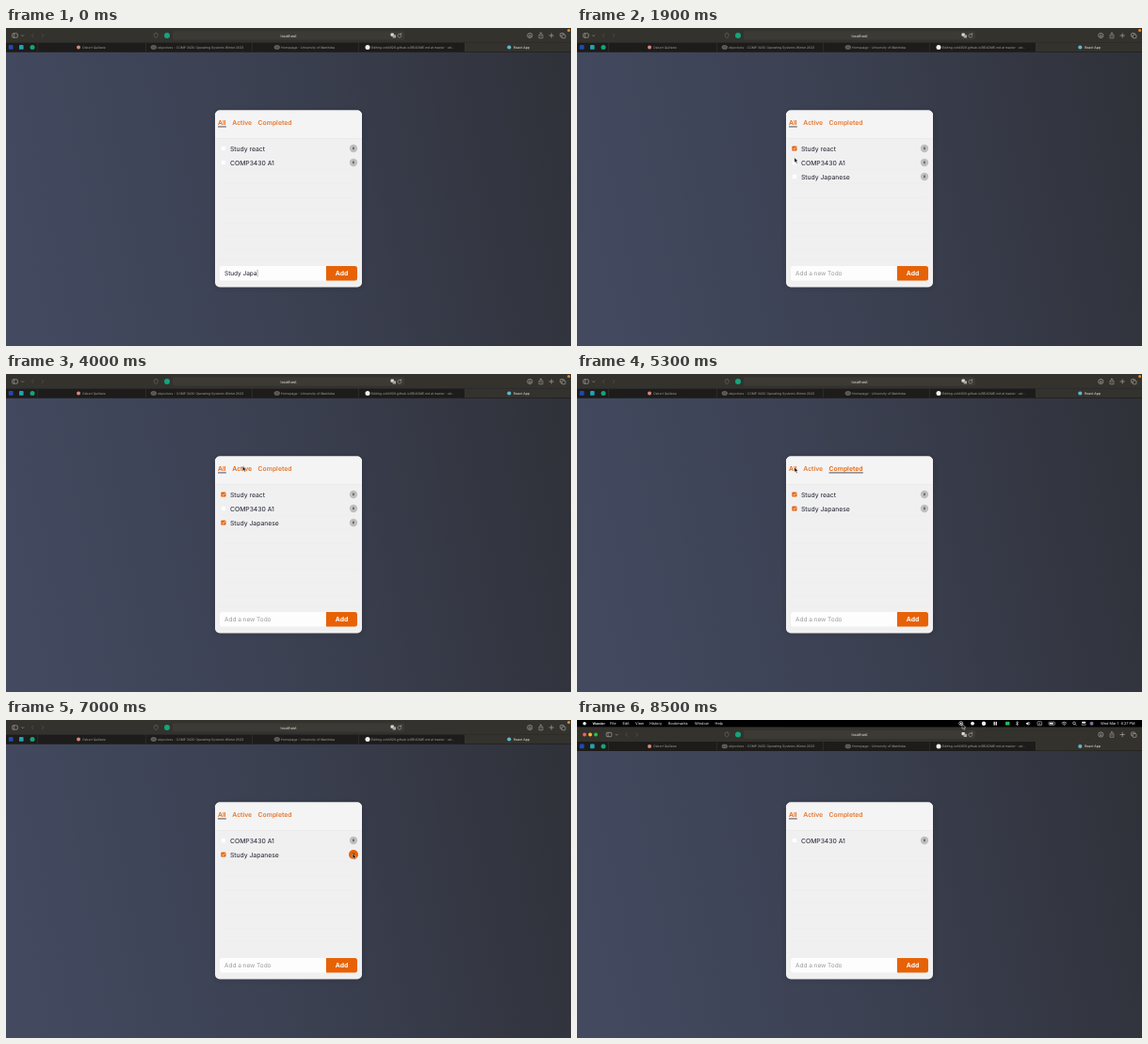
These frames come from a looping animation (600x338 px, 8600 ms). An HTML page:

```html
<!DOCTYPE html>
<html lang="en">
<head>
<meta charset="utf-8">
<title>Todo list</title>
<style>
  html, body { margin: 0; width: 100%; height: 100%; overflow: hidden; background: #31343c; }
  svg { display: block; width: 100%; height: 100%; }
  text { font-family: Inter, Roboto, sans-serif; text-rendering: geometricPrecision; white-space: pre; }
</style>
</head>
<body>
<svg id="stage" viewBox="0 0 600 338" xmlns="http://www.w3.org/2000/svg"></svg>
<script>
const LOOP = 8600, STEP = 100;
const ORANGE = '#e76206', INK = '#1d1f2c';

const rect = (x, y, w, h, fill, rx = 0, more = '') =>
  `<rect x="${x}" y="${y}" width="${w}" height="${h}" fill="${fill}" rx="${rx}" ${more}/>`;
const dot = (x, y, r, fill, more = '') => `<circle cx="${x}" cy="${y}" r="${r}" fill="${fill}" ${more}/>`;
const line = (d, stroke, w = 0.6) =>
  `<path d="${d}" fill="none" stroke="${stroke}" stroke-width="${w}" stroke-linecap="round" stroke-linejoin="round"/>`;
const text = (s, x, y, size, fill, more = '') =>
  `<text x="${x}" y="${y}" font-size="${size}" fill="${fill}" ${more}>${s}</text>`;
const group = (id, body) => `<g id="${id}">${body}</g>`;

function page() {
  return rect(0, 0, 600, 338, 'url(#sky)') +
    rect(221.5, 88.5, 157, 188, '#15171f', 6, 'opacity=".25" filter="url(#soft)"') +
    rect(222, 87.5, 156, 188, '#f0f0f1', 5) +
    `<path d="M222 117V92.500a5 5 0 0 1 5-5h146a5 5 0 0 1 5 5V117z" fill="#f4f4f5"/>` +
    rect(222, 117, 156, 0.6, '#e6e6e8') +
    [150.5, 165.5, 180.5, 193, 207, 221, 235].map(y => rect(228, y, 144, 0.4, '#ebebed')).join('') +
    rect(222, 246, 156, 0.5, '#ebebed') +
    rect(227, 253, 116, 15.5, '#fdfdfd', 2.5) +
    `<path d="M340 253h30.500a2.500 2.500 0 0 1 2.500 2.500v10.500a2.500 2.500 0 0 1-2.500 2.500H340z" fill="${ORANGE}"/>` +
    text('Add', 356.5, 263.3, 6.8, '#fff', 'font-weight="700" text-anchor="middle"');
}

function browser() {
  const gray = '#b9b7b1', dim = '#5c5a54';
  const tabs = [
    [81, 'Osbert Quillane', '#d9897b'],
    [161, 'objectives - COMP 3430 Operating Systems Winter 2023', '#55534f'],
    [292, 'Homepage - University of Manitoba', '#55534f'],
    [388, 'Editing velt4926.github.io/README.md at master · vel…', '#f2f2f2']
  ];
  const tools =
    rect(6.7, 5.8, 5.6, 4.4, 'none', 0.9, `stroke="${gray}" stroke-width=".6"`) +
    line('M8.600 6v4', gray, 0.5) + line('M16.500 7.700l1.100 1.100 1.100-1.100', gray, 0.5) +
    line('M29 6.200l-1.800 1.800 1.800 1.800', dim) + line('M38.200 6.200l1.800 1.800-1.800 1.800', dim);
  return rect(0, 0, 600, 15.7, '#34322d') +
    rect(0, 15.5, 600, 10, '#1d1c1a') +
    rect(487, 15.5, 113, 10, '#34322d') +
    [33, 148, 261, 374, 487].map(x => rect(x, 15.5, 0.5, 10, '#3a3833')).join('') +
    rect(0, 25, 600, 0.5, '#191919') +
    group('lights', dot(8, 8, 1.9, '#fb5f57') + dot(14, 8, 1.9, '#fdbc2e') + dot(20, 8, 1.9, '#28c840')) +
    group('tools', tools) +
    line('M159.200 5.600a4 4 0 0 1-2 .6v2q.2 1.600 2 2.400q1.800-.8 2-2.400v-2a4 4 0 0 1-2-.6z', '#77756f', 0.5) +
    dot(171, 8, 3, '#14a47c') +
    rect(177, 3.2, 246, 9.4, '#3c3a34', 2) +
    text('localhost', 300, 9.5, 4, '#ecebe8', 'text-anchor="middle"') +
    rect(408.5, 5.4, 3.4, 3.4, '#dddbd6', 0.7) + rect(410.6, 7.2, 3.4, 3.4, '#a8a6a0', 0.7) +
    line('M419.400 6.800a2 2 0 1 0 .5 1.600M419.700 5.600v1.400h-1.400', gray, 0.5) +
    dot(556.3, 8, 2.6, 'none', `stroke="${gray}" stroke-width=".6"`) +
    line('M556.300 6.600v2.700M555.200 8.300l1.100 1.100 1.100-1.100', gray, 0.5) +
    line('M566.800 7.200h-.8v3.600h4v-3.600h-.8M568 9V5M566.900 6l1.100-1.100 1.100 1.100', gray, 0.5) +
    line('M577 8h4.400M579.200 5.800v4.400', gray) +
    rect(588.6, 5.5, 3.8, 3.8, 'none', 0.7, `stroke="${gray}" stroke-width=".6"`) +
    rect(590.2, 7, 3.8, 3.8, '#34322d', 0.7, `stroke="${gray}" stroke-width=".6"`) +
    rect(2.8, 18, 4.8, 4.8, '#1f49b5', 0.9) + rect(14, 18, 4.6, 4.8, '#1fa3b4', 0.9) + dot(28, 20.5, 2.5, '#14a47c') +
    tabs.map(([x, s, c], i) =>
      (i == 1 || i == 2 ? rect(x - 7, 18.6, 5.6, 3.8, c, 1.9, 'stroke="#9a9893" stroke-width=".4"') : dot(x - 4, 20.5, i ? 2.5 : 2, c)) +
      text(s, x, 21.8, 3.38, '#a5a39e')).join('') +
    dot(534.3, 20.5, 2.1, '#61b6cc') + text('React App', 539, 21.8, 3.5, '#f0efec');
}

function menu() {
  const items = [[35, 'File'], [48.5, 'Edit'], [62, 'View'], [77, 'History'], [97, 'Bookmarks'], [125, 'Window'], [146.5, 'Help']];
  const w = '#f0f0f0';
  return rect(0, 0, 600, 7.5, '#000') + dot(8, 3.7, 1.8, w) +
    text('Wander', 16.5, 5.1, 3.5, w, 'font-weight="700"') +
    items.map(([x, s]) => text(s, x, 5.1, 3.9, w)).join('') +
    dot(407.8, 3.7, 2, 'none', `stroke="${w}" stroke-width=".7"`) + rect(407, 2.9, 1.6, 1.6, w) +
    dot(420, 3.7, 1.9, w) + dot(432, 3.7, 2.2, w) +
    rect(442.5, 1.8, 1.3, 3.8, w) + rect(444.6, 1.8, 1.3, 3.8, w) +
    rect(455, 1.8, 4.4, 3.8, '#27b763', 0.6) +
    line('M466.300 2.600l2.400 2.200-1.200 1.100V1.500l1.200 1.100-2.400 2.200', w, 0.5) +
    `<path d="M477 3h1l1.500-1.300v4L478 4.500h-1z" fill="${w}"/>` + line('M480.500 2.500q1 1.200 0 2.400', w, 0.5) +
    rect(489, 1.7, 4.6, 4, 'none', 0.7, `stroke="${w}" stroke-width=".5"`) +
    text('A', 491.3, 4.9, 3.2, w, 'text-anchor="middle"') +
    rect(501, 2.1, 6.4, 3.2, 'none', 0.8, `stroke="${w}" stroke-width=".5"`) + rect(501.8, 2.9, 4, 1.6, w) +
    line('M515 3q2.300-2 4.600 0M516 4.200q1.300-1 2.600 0M517.300 5.400h.1', w, 0.7) +
    dot(528, 3.4, 1.4, 'none', `stroke="${w}" stroke-width=".6"`) + line('M529.100 4.500l1.100 1.100', w) +
    rect(536, 1.8, 4.4, 1.6, w, 0.8) + rect(536, 4, 4.4, 1.6, 'none', 0.8, `stroke="${w}" stroke-width=".4"`) +
    dot(546.5, 3.7, 2, '#7d7196') +
    text('Wed Mar 1  8:27 PM', 556, 5.1, 3.9, w);
}

const stage = document.getElementById('stage');
stage.innerHTML = `<defs>
  <linearGradient id="sky" gradientUnits="userSpaceOnUse" x1="0" y1="230" x2="600" y2="110">
    <stop offset="0" stop-color="#434a60"/><stop offset=".5" stop-color="#3b4051"/><stop offset="1" stop-color="#30323a"/>
  </linearGradient>
  <filter id="soft" x="-10%" y="-10%" width="120%" height="120%"><feGaussianBlur stdDeviation="2.500"/></filter>
</defs>` + page() + group('list', '') + group('browser', browser()) + group('menu', menu()) +
  dot(597.6, 2.4, 1.5, '#f08a24', 'id="rec"') +
  `<path id="pointer" d="M0 0v5.200l1.250-1.100.9 2 .95-.4-.9-2h1.600z" fill="#0b0b0b" stroke="#fff" stroke-width=".45" stroke-linejoin="round"/>`;
const el = Object.fromEntries(['list', 'browser', 'menu', 'lights', 'tools', 'rec', 'pointer']
  .map(id => [id, document.getElementById(id)]));

// pointer stops: time, x, y
const PATH = [
  [900, 318, 258], [1500, 229.5, 127], [1700, 229.5, 127], [1900, 230.9, 137.8], [2300, 230, 156.5],
  [2900, 230, 156.5], [3600, 248, 103], [4000, 251.3, 98], [4300, 251.3, 98], [4700, 284, 98],
  [4900, 284, 98], [5300, 231, 99.2], [5500, 231, 99.2], [6000, 377, 124], [6300, 368, 127],
  [6600, 368, 127], [6900, 368.2, 142.2], [7300, 368.2, 142.2], [8000, 391.5, -0.5], [8200, 392.3, -0.8], [8500, 409, 4.2]
];
const TASKS = [
  { name: 'Study react', from: 0, check: 1600, gone: 6500 },
  { name: 'COMP3430 A1', from: 0, check: Infinity, gone: Infinity },
  { name: 'Study Japanese', from: 700, check: 2400, gone: 7300 }
];
const TABS = [['All', 225, 8.8], ['Active', 240.3, 20.7], ['Completed', 267.6, 36.2]];

function pointerAt(t) {
  if (t <= PATH[0][0]) return [-20, -20];
  const i = PATH.findIndex(p => p[0] >= t);
  const [t0, x0, y0] = PATH[i - 1], [t1, x1, y1] = PATH[i];
  const u = (t - t0) / (t1 - t0), k = u * u * (3 - 2 * u);
  return [x0 + (x1 - x0) * k, y0 + (y1 - y0) * k];
}

function row(task, i, t, x, y) {
  const cy = 128 + 15 * i, done = t >= task.check;
  const hot = Math.hypot(x - 369, y - cy) < 4.8;
  return rect(228.3, cy - 2.6, 5.2, 5.2, done ? ORANGE : '#fff', 1.2, done ? '' : 'stroke="#e2e2e4" stroke-width=".35"') +
    (done ? line(`M229.700 ${cy + 0.1}l1 1.100 1.700-2.300`, '#fff', 0.7) : '') +
    text(task.name, 238, cy + 2.6, 6.85, INK, 'letter-spacing="-.03"') +
    dot(369, cy, hot ? 5 : 4.2, hot ? ORANGE : '#bfbfc0') +
    rect(368, cy - 1.1, 1.9, 2.3, hot ? '#4a2508' : '#6a6a6c', 0.4) +
    rect(367.7, cy - 1.6, 2.5, 0.4, hot ? '#4a2508' : '#6a6a6c');
}

function field(t) {
  const style = 'letter-spacing="-.03"';
  if (t >= 700) return text('Add a new Todo', 232, 263.2, 6.5, '#9b9b9f', style);
  const typed = 'Study Japanese'.slice(0, 10 + Math.floor(t / 100));
  return text(`${typed}<tspan fill="#3a3a48" font-weight="300" dx="-.5">|</tspan>`, 232, 263.2, 6.5, INK, style);
}

function draw(t) {
  const [x, y] = pointerAt(t);
  const tab = t < 4200 || t >= 5400 ? 0 : t < 4800 ? 1 : 2;
  const shown = TASKS.filter(k => t >= k.from && t < k.gone && (!tab || (t >= k.check) === (tab === 2)));

  el.list.innerHTML = TABS.map(([name, tx, w], i) => {
    const hot = i === tab || (x >= tx && x <= tx + w && y > 94 && y < 106);
    return text(name, tx, 102.5, 6.85, hot ? ORANGE : '#e5772e', 'font-weight="600" letter-spacing="-.03"') +
      (i === tab ? rect(tx, 104.5, w, 0.9, '#383c4b') : '');
  }).join('') + shown.map((k, i) => row(k, i, t, x, y)).join('') + field(t);

  const drop = t < 8300 ? 0 : t < 8400 ? 0.3 : t < 8500 ? 0.8 : 1;
  el.browser.setAttribute('transform', `translate(0 ${7.5 * drop})`);
  el.menu.setAttribute('transform', `translate(0 ${7.5 * (drop - 1) - (drop ? 0 : 1)})`);
  el.tools.setAttribute('transform', `translate(${24.5 * drop} 0)`);
  el.lights.setAttribute('opacity', drop);
  el.rec.setAttribute('opacity', drop ? 0 : 1);
  el.pointer.setAttribute('transform', `translate(${x} ${y})`);
}

let last = -1;
function tick(now) {
  const t = Math.floor((now % LOOP) / STEP) * STEP;
  if (t !== last) draw(last = t);
  requestAnimationFrame(tick);
}
draw(0);
requestAnimationFrame(tick);
</script>
</body>
</html>
```
